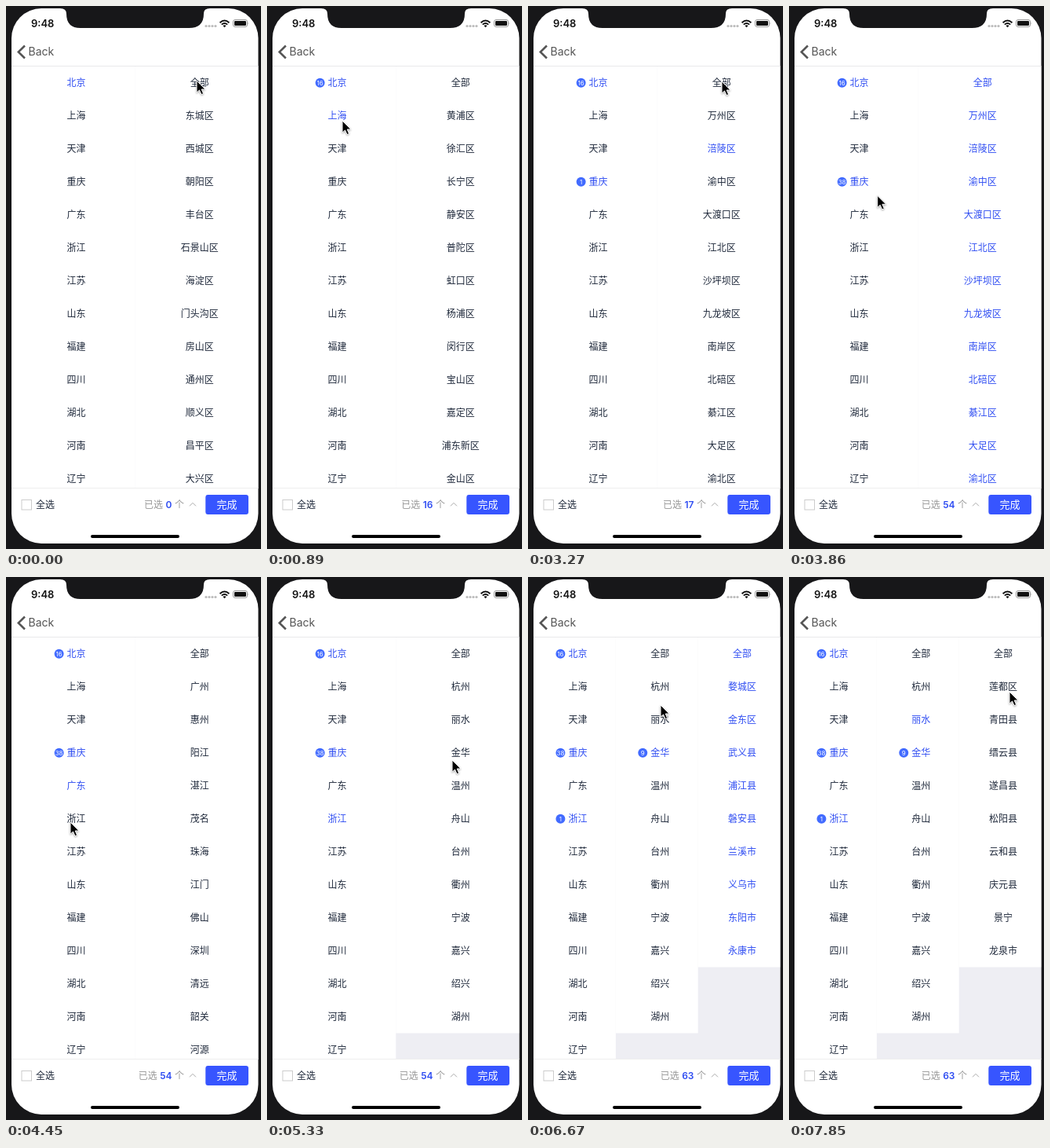
Animation, 325 px wide and 691 px high, one loop 8000 ms. Source, as an HTML page:

```html
<!DOCTYPE html>
<html lang="zh">
<head>
<meta charset="utf-8">
<title>Region picker</title>
<style>
html, body { margin: 0; width: 100%; height: 100%; overflow: hidden; background: #171719; }
svg { display: block; width: 325px; height: 691px; }
text { font-family: "Noto Sans CJK SC", "Noto Sans CJK", sans-serif; font-size: 12px; fill: #1f293b; }
.latin { font-family: Inter, Roboto, sans-serif; }
.on { fill: #2f4df2; }
.soft { fill: #999; }
.badge { font-size: 8px; fill: #fff; text-anchor: middle; }
</style>
</head>
<body>
<svg viewBox="0 0 325 691">
  <defs>
    <clipPath id="body"><rect x="7" y="76.5" width="314.5" height="537"/></clipPath>
  </defs>
  <rect width="325" height="691" fill="#171719"/>
  <rect x="7" y="3" width="314.5" height="681" rx="38" fill="#fff"/>
  <path d="M69 2V3Q77 3 77 10Q77 28 95 28H233Q252 28 252 10Q252 3 260 3V2Z" fill="#171719"/>

  <text class="latin" x="32" y="27" style="font-size:13px;font-weight:600;fill:#111">9:48</text>
  <g fill="#bbb">
    <circle cx="255" cy="25.5" r="1.6"/><circle cx="259" cy="25.5" r="1.6"/>
    <circle cx="263" cy="25.5" r="1.6"/><circle cx="267" cy="25.5" r="1.6"/>
  </g>
  <g fill="none" stroke="#111" stroke-width="1.9">
    <path d="M272.6 21.2Q278.5 15.8 284.4 21.2"/>
    <path d="M274.8 23.6Q278.5 20.4 282.2 23.6"/>
  </g>
  <path d="M276.4 25Q278.5 23.4 280.6 25L278.5 27.2Z" fill="#111"/>
  <rect x="289.5" y="17.5" width="18" height="9" rx="2.5" fill="none" stroke="#999"/>
  <rect x="291" y="19" width="15" height="6" rx="1.3" fill="#111"/>
  <path d="M308.6 20.5q1.6 1.5 0 3z" fill="#999"/>

  <path d="M24 50.5L15.8 58.5L24 66.5" fill="none" stroke="#555" stroke-width="2.5"/>
  <text class="latin" x="28.5" y="63.3" style="font-size:14px;fill:#555">Back</text>
  <rect x="7" y="76" width="314.5" height="1.2" fill="#dcdcde"/>

  <g id="columns" clip-path="url(#body)"></g>

  <rect x="7" y="613" width="314.5" height="1" fill="#eee"/>
  <rect x="20" y="628.5" width="12.5" height="12.5" fill="#fff" stroke="#ccc"/>
  <text x="38" y="639">全选</text>
  <text x="227" y="639" text-anchor="end" class="soft">已选<tspan id="total" class="latin on" dx="3.5" font-weight="600"></tspan><tspan dx="3.5">个</tspan></text>
  <path d="M234 636.3L238 632.3L242 636.3" fill="none" stroke="#aaa"/>
  <rect x="254.3" y="622" width="54.7" height="25" rx="3" fill="#3755ff"/>
  <text x="281.5" y="639.3" text-anchor="middle" style="font-size:13px;fill:#fff">完成</text>
  <rect x="108" y="673" width="113" height="4" rx="2" fill="#000"/>

  <path id="cursor" d="M0 0V15.2L3.5 12L6 17.6L8.6 16.5L6.2 11H11Z" fill="#000" stroke="#fff" stroke-width="1"
    style="filter:drop-shadow(0 1px 1px rgba(0,0,0,.35))"/>
</svg>
<script>
const LOOP = 8000, STEPS = 54;
const ROW = 42, TOP = 76.5, LEFT = 7, WIDTH = 314.5;

const provinces = '北京 上海 天津 重庆 广东 浙江 江苏 山东 福建 四川 湖北 河南 辽宁'.split(' ');
const regions = {
  北京: '东城区 西城区 朝阳区 丰台区 石景山区 海淀区 门头沟区 房山区 通州区 顺义区 昌平区 大兴区',
  上海: '黄浦区 徐汇区 长宁区 静安区 普陀区 虹口区 杨浦区 闵行区 宝山区 嘉定区 浦东新区 金山区',
  天津: '和平区 河东区 河西区 南开区 河北区 红桥区 东丽区 西青区 津南区 北辰区 武清区 宝坻区',
  重庆: '万州区 涪陵区 渝中区 大渡口区 江北区 沙坪坝区 九龙坡区 南岸区 北碚区 綦江区 大足区 渝北区',
  广东: '广州 惠州 阳江 湛江 茂名 珠海 江门 佛山 深圳 清远 韶关 河源',
  浙江: '杭州 丽水 金华 温州 舟山 台州 衢州 宁波 嘉兴 绍兴 湖州',
  金华: '婺城区 金东区 武义县 浦江县 磐安县 兰溪市 义乌市 东阳市 永康市',
  丽水: '莲都区 青田县 缙云县 遂昌县 松阳县 云和县 庆元县 景宁 龙泉市'
};
const totals = { 北京: 16, 重庆: 38, 金华: 9 };
const listOf = name => ['全部', ...regions[name].split(' ')];

// step, column, row
const clicks = [
  [1, 1, 0], [6, 0, 1], [8, 0, 2], [10, 0, 3], [17, 1, 2], [23, 1, 0], [27, 0, 4],
  [31, 0, 5], [37, 1, 3], [42, 2, 0], [47, 1, 2], [53, 2, 1]
];
// step, x, y
const path = [
  [0, 243, 95], [1, 242, 96], [5, 108, 138], [6, 96, 146], [8, 92, 188], [10, 92, 232],
  [11, 92, 238], [13, 92, 238], [16, 236, 186], [17, 245, 181], [18, 247, 176], [20, 248, 113],
  [22, 247, 96], [23, 246, 97], [27, 88, 268], [28, 86, 275], [30, 82, 312], [31, 83, 313],
  [35, 236, 233], [36, 244, 227], [37, 245, 226], [41, 270, 102], [42, 272, 97], [43, 262, 106],
  [45, 169, 163], [47, 168, 178], [48, 180, 176], [52, 281, 146], [53, 281, 146]
];

function stateAt(step) {
  const state = { province: '北京', city: null, picked: {} };
  for (const [at, column, row] of clicks) {
    if (at > step) break;
    if (column === 0) {
      state.province = provinces[row];
      state.city = null;
    } else if (column === 1 && state.province === '浙江') {
      state.city = listOf('浙江')[row];
    } else {
      const name = state.city || state.province;
      (state.picked[name] ||= new Set()).add(row);
    }
  }
  return state;
}

function cursorAt(step) {
  const i = Math.max(1, path.findIndex(key => key[0] >= step));
  const [a, ax, ay] = path[i - 1], [b, bx, by] = path[i];
  const u = (step - a) / (b - a), k = u * u * (3 - 2 * u);
  return [ax + (bx - ax) * k, ay + (by - ay) * k];
}

function column(index, count, items, isOn, badgeOf) {
  const width = WIDTH / count, x = LEFT + index * width, center = x + width / 2 + 4;
  let out = `<rect x="${x}" y="${TOP}" width="${width}" height="${items.length * ROW}" fill="#fff"/>`;
  items.forEach((name, row) => {
    const y = TOP + 21 + row * ROW, badge = badgeOf(name);
    out += `<text x="${center}" y="${y + 4.5}" text-anchor="middle" class="${isOn(name, row) || badge ? 'on' : ''}">${name}</text>`;
    if (badge) {
      const bx = center - name.length * 6 - 10;
      out += `<circle cx="${bx}" cy="${y + .3}" r="6" fill="#426bff"/>
        <text class="latin badge" x="${bx}" y="${y + 3.2}">${badge}</text>`;
    }
  });
  return out;
}

function render(step) {
  const { province, city, picked } = stateAt(step);
  const amount = name => !picked[name] ? 0 : picked[name].has(0) ? totals[name] : picked[name].size;
  const cityBadges = listOf('浙江').filter(amount).length;
  const isPicked = name => (_, row) => !!picked[name] && (picked[name].has(0) || picked[name].has(row));
  const count = city ? 3 : 2, none = () => 0;

  let out = `<rect x="${LEFT}" y="${TOP}" width="${WIDTH}" height="537" fill="#eeeef3"/>`;
  out += column(0, count, provinces, name => name === province,
    name => name === '浙江' ? cityBadges : amount(name));
  out += column(1, count, listOf(province),
    (name, row) => name === city || isPicked(province)(name, row), city ? amount : none);
  if (city) out += column(2, count, listOf(city), isPicked(city), none);

  document.getElementById('columns').innerHTML = out;
  document.getElementById('total').textContent =
    Object.keys(picked).reduce((sum, name) => sum + amount(name), 0);
  document.getElementById('cursor').setAttribute('transform', `translate(${cursorAt(step)})`);
}

let shown = -1;
const start = performance.now();
function tick() {
  const time = (performance.now() - start) % LOOP;
  const step = Math.floor(time / LOOP * STEPS);
  if (step !== shown) render(shown = step);
  requestAnimationFrame(tick);
}
tick();
</script>
</body>
</html>
```
